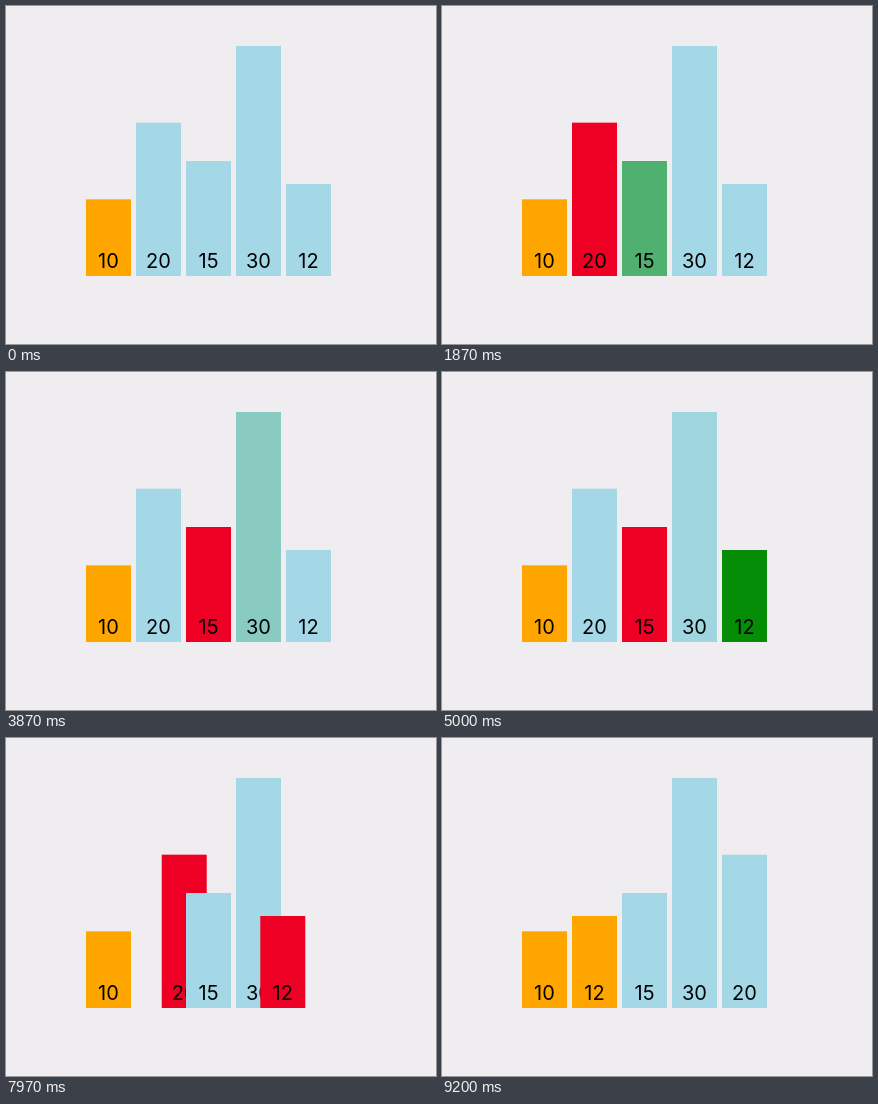
Animation, 430 px wide and 338 px high, one loop 9610 ms. Source, as an HTML page:

```html
<!DOCTYPE html>
<html lang="en">
<head>
<meta charset="utf-8">
<title>Selection sort</title>
<style>
  html, body { margin: 0; width: 100%; height: 100%; overflow: hidden; background: #efedf0; }
  svg { display: block; }
  text { font: 20px Inter, Arial, sans-serif; text-anchor: middle; }
</style>
</head>
<body>
<svg id="stage" width="430" height="338"></svg>
<script>
const LOOP = 9610, MOVE = 340, BASE = 270, UNIT = 230 / 30;
const BLUE = [165, 216, 231], ORANGE = [255, 165, 0], RED = [238, 0, 36], GREEN = [0, 138, 0];

// Colour changes are [start ms, colour]; the swap moves a bar by whole slots.
const SWAP = 7851;
const bars = [
  { value: 10, color: ORANGE, changes: [] },
  { value: 20, color: BLUE, shift: 3, changes: [[695, RED], [2700, BLUE], [6845, RED], [8850, BLUE]] },
  { value: 15, color: BLUE, changes: [[1698, GREEN], [2700, RED], [5815, BLUE]] },
  { value: 30, color: BLUE, changes: [[3752, GREEN], [4730, BLUE]] },
  { value: 12, color: BLUE, shift: -3, changes: [[4730, GREEN], [5815, RED], [8850, ORANGE]] }
];

function add(parent, tag, attrs) {
  const el = document.createElementNS("http://www.w3.org/2000/svg", tag);
  for (const name in attrs) el.setAttribute(name, attrs[name]);
  return parent.appendChild(el);
}

// Cubic ease in and out, from 0 before the start to 1 after the end.
function progress(time, start) {
  const p = Math.min(1, Math.max(0, (time - start) / MOVE));
  return p < 0.5 ? 4 * p ** 3 : 1 - 4 * (1 - p) ** 3;
}

function colorAt(bar, time) {
  return bar.changes.reduce((from, [start, to]) => {
    const p = progress(time, start);
    return from.map((c, i) => c + (to[i] - c) * p);
  }, bar.color);
}

const stage = document.getElementById("stage");
for (const bar of bars) {
  const height = bar.value * UNIT;
  bar.group = add(stage, "g", {});
  bar.rect = add(bar.group, "rect", { y: BASE - height, width: 45, height });
  add(bar.group, "text", { x: 22.5, y: 262 }).textContent = bar.value;
}

function draw(now) {
  const time = now % LOOP;
  bars.forEach((bar, i) => {
    const x = 80 + 50 * (i + (bar.shift || 0) * progress(time, SWAP));
    bar.group.setAttribute("transform", `translate(${x} 0)`);
    bar.rect.setAttribute("fill", `rgb(${colorAt(bar, time).map(Math.round)})`);
  });
}

let begin;
function tick(now) {
  begin ??= now;
  draw(now - begin);
  requestAnimationFrame(tick);
}
draw(0);
requestAnimationFrame(tick);
</script>
</body>
</html>
```
